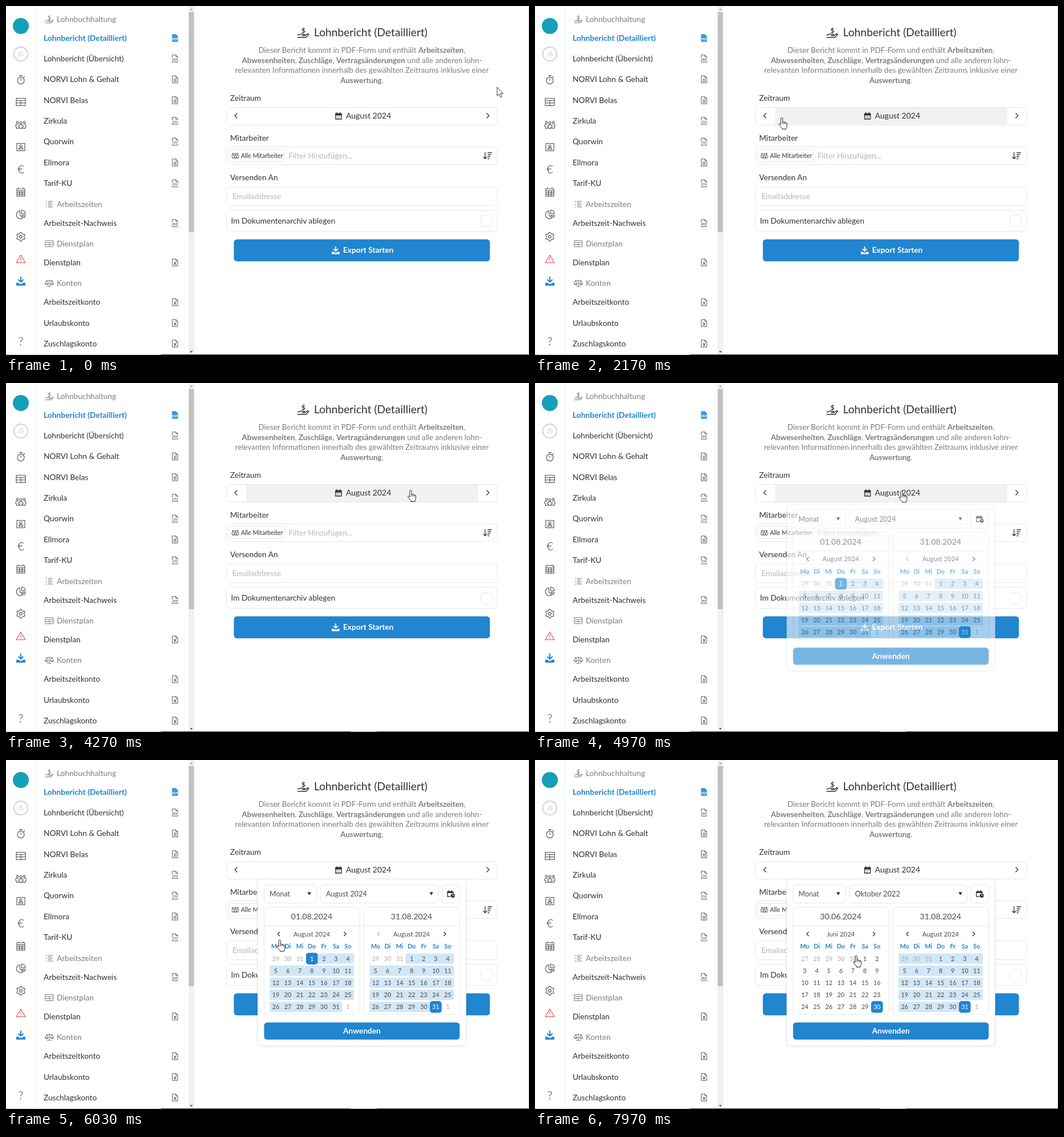
An HTML page for the animation above (8000 ms loop, 917 by 611 pixels).

```html
<!DOCTYPE html>
<html lang="de">
<head>
<meta charset="utf-8">
<title>Lohnbericht</title>
<style>
html, body { margin: 0; width: 100%; height: 100%; overflow: hidden; background: #fff; }
svg { display: block; width: 917px; height: 611px; font-family: Lato, "Open Sans", sans-serif; }
text { white-space: pre; }
.b { font-weight: 700; }
.thin { font-weight: 300; }
.mid { text-anchor: middle; }
.box { fill: #fff; stroke: #e6e7e9; }
.line { fill: none; stroke-linecap: round; stroke-linejoin: round; }
</style>
</head>
<body>
<svg id="stage" viewBox="0 0 917 611"></svg>
<script>
const LOOP = 8000, BLUE = '#2185d0', INK = '#2f3134', SOFT = '#4a4c50', GREY = '#7b7d80', PALE = '#b3b5b8';

// Drawing helpers; text is placed by the middle of its capitals.
const text = (x, y, s, color = INK, size = 13.7, cls = '') =>
  `<text x="${x}" y="${y + size * .36}" font-size="${size}" fill="${color}" class="${cls}">${s}</text>`;
const rect = (x, y, w, h, r, attr = 'class="box"') =>
  `<rect x="${x}" y="${y}" width="${w}" height="${h}" rx="${r}" ${attr}/>`;
const path = (d, color = INK, width = 1.2) =>
  `<path d="${d}" class="line" stroke="${color}" stroke-width="${width}"/>`;
const fill = (d, color) => `<path d="${d}" fill="${color}"/>`;
const at = (x, y, s, scale = 1) => `<g transform="translate(${x} ${y}) scale(${scale})">${s}</g>`;
const ring = (x, y, r) => `M${x - r} ${y}a${r} ${r} 0 1 0 ${2 * r} 0a${r} ${r} 0 1 0 ${-2 * r} 0`;
const frame = (w, h) => `M${-w / 2} ${-h / 2}h${w}v${h}h${-w}z`;
const chevron = (x, y, dir, color = INK, s = 1) =>
  path(`M${x - 2 * dir * s} ${y - 4 * s}l${4 * dir * s} ${4 * s}l${-4 * dir * s} ${4 * s}`, color, 1.3);

let gear = '';
for (let i = 0; i < 48; i++) {
  const a = i * Math.PI / 24, r = 6.7 + 1.1 * Math.tanh(2 * Math.cos(6 * a));
  gear += (i ? 'L' : 'M') + (r * Math.sin(a)).toFixed(2) + ' ' + (-r * Math.cos(a)).toFixed(2);
}

const ICON = {
  watch: ring(0, 1.5, 6) + 'M-2.5-7.5h5M0-7.5v3M0 1.5V-2M5-4l1.5-1.5',
  table: frame(16, 13) + 'M-8-2.7H8M-8 1.8H8M0-2.7V6.5',
  people: ring(-6, -4.5, 1.8) + ring(0, -3.5, 2) + ring(6, -4.5, 1.8) +
    'M-4 6.5V2.5q0-2.5 4-2.5t4 2.5V6.5M-2 3V6.5h4V3M-5-1q-4-.8-4 2V3l1.5 1v2.5h2M5-1q4-.8 4 2V3l-1.5 1v2.5h-2',
  card: frame(14, 13) + ring(0, -2, 2) + 'M-3.7 4q0-2.7 3.7-2.7t3.7 2.7z',
  calendar: frame(14, 13) + 'M-7-3H7M-7 .2H7M-7 3.3H7M-2.4-3V6.5M2.4-3V6.5M-4-8.5v2M4-8.5v2',
  pie: 'M-1.5-6.5A7 7 0 1 0 3.5 6L-1.5 .8ZM1.5-8A7 7 0 0 1 8-1.3H1.5ZM1.8 1.2H8A7 7 0 0 1 6 5.3Z',
  gear: gear + 'z' + ring(0, 0, 2.4),
  warn: 'M0-7L8 6.5H-8ZM0-2.3v4M0 4v.4',
  list: 'M-2-5H6M-2 0H6M-2 5H6M-6-5h1.5M-6 0h1.5M-6 5h1.5M-2-2.5h5M-2 2.5h5',
  scale: 'M0-6V6M-4 6H4M-6-4.5H6M-5-4.5L-8 1.5h6zM5-4.5L2 1.5h6zM-8 1.5q3 3.5 6 0M2 1.5q3 3.5 6 0',
  pay: 'M-10 3h3q3-2.4 5.5-.8h3q1.6 1.2 0 2.2h-3.5M3 4.2l4.5-3q2.2-.4 1.5 1.3L4.5 7.5H-10'
};
const icon = (name, x, y, color = SOFT, scale = 1, width = 1.1) =>
  at(x, y, path(ICON[name], color, width), scale);
const pay = (x, y, color, scale, width) =>
  icon('pay', x, y, color, scale, width) + text(x, y - 4.5 * scale, '$', color, 12 * scale, 'b mid');
const download = (x, y, color, s = 1) => at(x, y,
  path('M0-7.5V1M-4-2.7L0 1.3L4-2.7', color, 2) + fill('M-8 2.5h4l2 2h4l2-2h4v5h-16z', color), s);

function fileIcon(y, kind) {
  const on = kind === 'PDF!', color = on ? '#3f97dc' : '#5a5c60', body = 'M-4.5-6.2H1.3L4.5-3V6.2H-4.5Z';
  let s = (on ? fill(body, color) : '') + path(body + 'M1.3-6.2V-3H4.5', color, 1);
  if (kind === 'doc') s += path('M-2.3-.5H2.3M-2.3 1.6H2.3M-2.3 3.7H2.3', color, 1);
  else if (kind === 'x') s += path('M-1.8-.6l3.6 4.4M1.8-.6l-3.6 4.4', color, 1.2);
  else s += (on ? '' : rect(-6, -.8, 12, 5, 0, 'fill="#fff"')) +
    text(0, 1.9, kind.slice(0, 3), on ? '#fff' : color, 5, 'b mid');
  return at(296.5, y, s);
}

function sidebar() {
  let s = '<circle cx="26" cy="35" r="14" fill="#159fb8"/>' +
    path(ring(26, 84, 12.2), '#b9bbbe') + text(26, 84, 'JS', '#c9cbce', 10.5, 'mid') +
    path('M52.5 0V610', '#f0f0f1', 1);
  const items = [['watch', 129], ['table', 168], ['people', 208], ['card', 247], ['calendar', 326.5], ['pie', 365], ['gear', 404]];
  for (const [name, y] of items) s += icon(name, 26, y);
  return s + icon('warn', 26, 443, '#e04848') + download(26, 482, BLUE) +
    text(26, 286, '€', INK, 20, 'mid thin') + text(26, 587, '?', INK, 20, 'mid thin');
}

function reportList() {
  const rows = [
    [92, 'Lohnbericht (Übersicht)', 'PDF'], [128.5, 'NORVI Lohn &amp; Gehalt', 'doc'],
    [165, 'NORVI Belas', 'doc'], [201, 'Zirkula', 'CSV'], [237.5, 'Quorwin', 'CSV'],
    [274, 'Ellmora', 'doc'], [310.5, 'Tarif-KU', 'CSV'], [380, 'Arbeitszeit-Nachweis', 'PDF'],
    [449, 'Dienstplan', 'x'], [518.5, 'Arbeitszeitkonto', 'x'],
    [555, 'Urlaubskonto', 'x'], [591, 'Zuschlagskonto', 'x']
  ];
  let s = text(66, 56, 'Lohnbericht (Detailliert)', BLUE, 13.8, 'b') + fileIcon(56, 'PDF!');
  for (const [y, name, kind] of rows) s += text(66, y, name) + fileIcon(y, kind);
  s += pay(76, 24, GREY, .72, 1.4) + icon('list', 76, 347, GREY) +
    icon('table', 76, 416, GREY, .85) + icon('scale', 76, 485, GREY, .95);
  const heads = [[23, 'Lohnbuchhaltung'], [347, 'Arbeitszeiten'], [416, 'Dienstplan'], [485.5, 'Konten']];
  for (const [y, name] of heads) s += text(89, y, name, GREY);
  return s + rect(320, 0, 10.5, 610, 0, 'fill="#f1f1f1"') + rect(320.5, 10.5, 9, 385.5, 0, 'fill="#c1c1c1"') +
    fill('M322.5 7l2.5-3l2.5 3z', '#a3a3a3') + fill('M322.5 604l2.5 3l2.5-3z', '#505050');
}

function form() {
  const lines = [
    'Dieser Bericht kommt in PDF-Form und enthält *Arbeitszeiten*,',
    '*Abwesenheiten*, *Zuschläge*, *Vertragsänderungen* und alle anderen lohn-',
    'relevanten Informationen innerhalb des gewählten Zeitraums inklusive einer',
    '*Auswertung*.'
  ];
  let s = pay(521.5, 47.5, INK, 1, 1.5) + text(540, 46, 'Lohnbericht (Detailliert)', INK, 19.2);
  lines.forEach((l, i) => {
    s += text(624, 77 + i * 17.7, l.replace(/\*(.+?)\*/g, '<tspan class="b">$1</tspan>'), GREY, 13.4, 'mid');
  });
  s += text(393, 161, 'Zeitraum') + text(393, 231, 'Mitarbeiter') + text(393, 300, 'Versenden An');
  s += rect(386.5, 177.5, 475, 31, 5) + '<rect id="hover" y="178" height="30" fill="#f1f1f1"/>' +
    chevron(403, 192, -1) + chevron(845, 192, 1) + '<g id="period"></g>';
  s += rect(386.5, 246.5, 475, 31, 5) + rect(390.5, 250.5, 97, 22, 4) + icon('people', 402, 262, SOFT, .68, 1.4) +
    text(412, 262, 'Alle Mitarbeiter', INK, 10.7) + text(495.5, 262, 'Filter Hinzufügen...', PALE, 13.5) +
    path('M840 256.5V267.5M837 264.5l3 3l3-3M845 257h6.5M845 260.5h5M845 264h3.5M845 267.5h2', INK, 1.3);
  s += rect(386.5, 316.5, 475, 33, 5) + text(397, 333, 'Emailaddresse', PALE);
  s += rect(386.5, 357.5, 475, 37, 5) + text(394.5, 376, 'Im Dokumentenarchiv ablegen') + rect(832.5, 366.5, 20, 20, 5);
  return s + rect(399.5, 408.5, 449, 38.5, 5.5, `fill="${BLUE}"`) + download(578, 428, '#fff', .85) +
    text(591, 427.5, 'Export Starten', '#fff', 13.7, 'b');
}

function period(label, x) {
  return at(x + 6, 192.5, path('M-5.2-4h10.4v9.5h-10.4z', INK, 1.3) + fill('M-5.2-4.5h10.4v3.7h-10.4z', INK) +
    path('M-2.8-6v1.5M2.8-6v1.5', INK, 1.5) + path('M-2.6 1.3h.4M0 1.3h.4M2.4 1.3h.4M-2.6 3.5h.4M0 3.5h.4', INK, 1.1)) +
    text(x + 19, 192, label, INK, 14);
}

const MONTHS = { 6: 'Juni', 7: 'Juli', 8: 'August' };
const day = (m, d) => Date.UTC(2024, m - 1, d);
const two = n => String(n).padStart(2, '0');

function calendar(x, month, picked, from, to, backColor) {
  const cx = x + 83.5, first = new Date(day(month, 1)), lead = (first.getUTCDay() + 6) % 7;
  const p = new Date(picked);
  let s = rect(x, 257.5, 168, 188, 6) + path(`M${x} 290.5H${x + 168}`, '#e6e7e9', 1) +
    text(cx, 274, `${two(p.getUTCDate())}.${two(p.getUTCMonth() + 1)}.2024`, SOFT, 14.2, 'mid') +
    chevron(x + 25.5, 304.5, -1, backColor, .8) + chevron(x + 142, 304.5, 1, INK, .8) +
    text(cx, 304.5, MONTHS[month] + ' 2024', SOFT, 11.3, 'mid');
  let cells = '', labels = '';
  ['Mo', 'Di', 'Mi', 'Do', 'Fr', 'Sa', 'So'].forEach((n, i) => {
    labels += text(x + 20.5 + i * 21.1, 326.5, n, BLUE, 10.7, 'b mid');
  });
  for (let i = 0; i < 35; i++) {
    const time = day(month, 1 - lead + i), d = new Date(time);
    const dx = x + 20.5 + i % 7 * 21.1, dy = 347.7 + Math.floor(i / 7) * 21.15;
    const own = d.getUTCMonth() === month - 1, sel = time === picked;
    if (time >= from && time <= to) cells += rect(dx - 10.6, dy - 9, 21.2, 18, 0, 'fill="#d1e6f6"');
    if (sel) labels += rect(dx - 10.3, dy - 10.3, 20.6, 20.6, 5, `fill="${BLUE}"`);
    labels += text(dx, dy, d.getUTCDate(), sel ? '#fff' : own ? SOFT : '#aaadb0', 10.9, 'mid');
  }
  return s + cells + labels;
}

function popover(step) {
  const start = [day(8, 1), day(7, 31), day(6, 30)][step], end = day(8, 31);
  return '<g filter="url(#soft)">' + rect(441.5, 208.5, 365, 291.5, 8, 'fill="#fff" stroke="#e8e9eb"') + '</g>' +
    fill('M616 209.5l8-8l8 8z', '#fff') +
    rect(452.5, 218.5, 92, 32, 5) + rect(551.5, 218.5, 206, 32, 5) + rect(764.5, 218.5, 31, 32, 5) +
    text(462, 234.5, 'Monat', SOFT, 12.5) +
    text(561, 234.5, step ? 'Oktober 2022' : 'August 2024', SOFT, 12.7) +
    fill('M528.5 231.5h6.5l-3.25 5.5zM742.5 231.5h6.5l-3.25 5.5z', INK) +
    at(779.5, 234.5, path('M-1 4.5H-5.5V-4H4.5V-1M-3-6v2M2-6v2', INK, 1.3) + fill('M-5.5-4h10v2.5h-10z', INK) +
      `<circle cx="3.8" cy="3" r="3.6" fill="${INK}"/>` + path('M3.8 1v2h1.6', '#fff', .9)) +
    calendar(452.5, 8 - step, start, start, end, INK) +
    calendar(627.5, 8, end, start, end, step ? INK : PALE) +
    rect(452.5, 459.5, 343, 30, 5.5, `fill="${BLUE}"`) + text(624, 474.5, 'Anwenden', '#fff', 13.7, 'b mid');
}

const arrow = `<path d="M0 0V15.5L3.6 12.2L6 17.8L8.4 16.8L6 11.4H10.8Z" fill="#fff" stroke="#222" stroke-width=".9"/>`;
const hand = `<path d="M-1.6 11.5V1.2a1.6 1.6 0 0 1 3.2 0V7.2q1.2-1 2.6 .4q1.3-.9 2.4 .5q2.2-.4 2.4 1.7v4q0 2.2-1.4 4V19.5H.5V18q-2.6-2.4-5-6q-.9-1.8 .6-2.2q1-.2 2.3 1.7z" fill="#fff" stroke="#222"/>` +
  path('M1.6 7.5v3M4.2 8v2.5M6.6 8.5v2.2', '#222', .9);

const stage = document.getElementById('stage');
stage.innerHTML = '<filter id="soft" x="-5%" y="-5%" width="110%" height="112%">' +
  '<feDropShadow dx="0" dy="1" stdDeviation="2" flood-opacity=".1"/></filter>' +
  sidebar() + reportList() + form() +
  path('M0 610.5H272', '#c9c9c9', 1) + path('M272 610.5H917', '#2a2a2a', 1) +
  '<path id="gap" d="M604 610.5H650" stroke="#999"/>' + path('M916.5 0V610', '#d6d6d6', 1) +
  `<g id="pop"></g><g id="cursor"><g id="arrow">${arrow}</g><g id="hand">${hand}</g></g>`;
const el = Object.fromEntries([...stage.querySelectorAll('[id]')].map(e => [e.id, e]));

// Cursor tip: time, x, y
const PATH = [
  [0, 861, 142], [470, 861, 142], [1270, 645, 197], [1300, 645, 197], [1430, 629, 204],
  [1830, 629, 204], [1950, 592, 206], [2170, 433, 196], [2330, 404, 192], [2970, 404, 192],
  [3630, 856, 190], [4130, 856, 190], [4270, 710, 188], [4500, 643, 189.5], [5530, 643, 189.5],
  [6030, 480, 315.5], [6300, 468, 309], [6370, 468, 309], [6430, 474, 310],
  [7570, 474, 310], [7970, 563, 343], [8000, 563, 343]
];

const slope = (i, k) => (PATH[i + 1][k] - PATH[i][k]) / (PATH[i + 1][0] - PATH[i][0]);
// Monotone tangents keep rests still and avoid overshoot.
function tangent(i, k) {
  if (i === 0 || i === PATH.length - 1) return 0;
  const a = slope(i - 1, k), b = slope(i, k);
  return a * b <= 0 ? 0 : 2 * a * b / (a + b);
}
function tip(t, k) {
  let i = 0;
  while (i < PATH.length - 2 && t >= PATH[i + 1][0]) i++;
  const a = PATH[i], b = PATH[i + 1], h = b[0] - a[0], u = (t - a[0]) / h, v = 1 - u;
  return v * v * (1 + 2 * u) * a[k] + u * u * (3 - 2 * u) * b[k] +
    h * u * v * (v * tangent(i, k) - u * tangent(i + 1, k));
}

const shown = {};
function swap(id, key, make) {
  if (shown[id] === key) return;
  shown[id] = key;
  el[id].innerHTML = make();
}
const show = (e, on) => e.setAttribute('visibility', on ? 'visible' : 'hidden');

function render(t) {
  const x = tip(t, 1), y = tip(t, 2);
  const inRow = y >= 177 && y <= 209 && x <= 861;
  el.cursor.setAttribute('transform', `translate(${x.toFixed(2)} ${y.toFixed(2)})`);
  const pointing = inRow || t > 1270;
  show(el.hand, pointing);
  show(el.arrow, !pointing);

  const [left, right] = x < 421 ? [387, 420] : x < 828 ? [421, 828] : [828, 861];
  el.hover.setAttribute('x', left);
  el.hover.setAttribute('width', right - left);
  show(el.hover, inRow);

  const july = t >= 2560 && t < 3860;
  swap('period', july, () => july ? period('Juli 2024', 585) : period('August 2024', 577));
  show(el.gap, t >= 2600);

  const step = t < 6700 ? 0 : t < 7200 ? 1 : 2;
  swap('pop', step, () => popover(step));
  const rest = (1 - Math.min(1, Math.max(0, (t - 4860) / 300))) ** 2;
  el.pop.setAttribute('opacity', 1 - rest);
  el.pop.setAttribute('transform', `translate(0 ${(rest * 9.5).toFixed(2)})`);
  show(el.pop, rest < 1);
}

function tick() {
  render(performance.now() % LOOP);
  requestAnimationFrame(tick);
}
tick();
</script>
</body>
</html>
```
